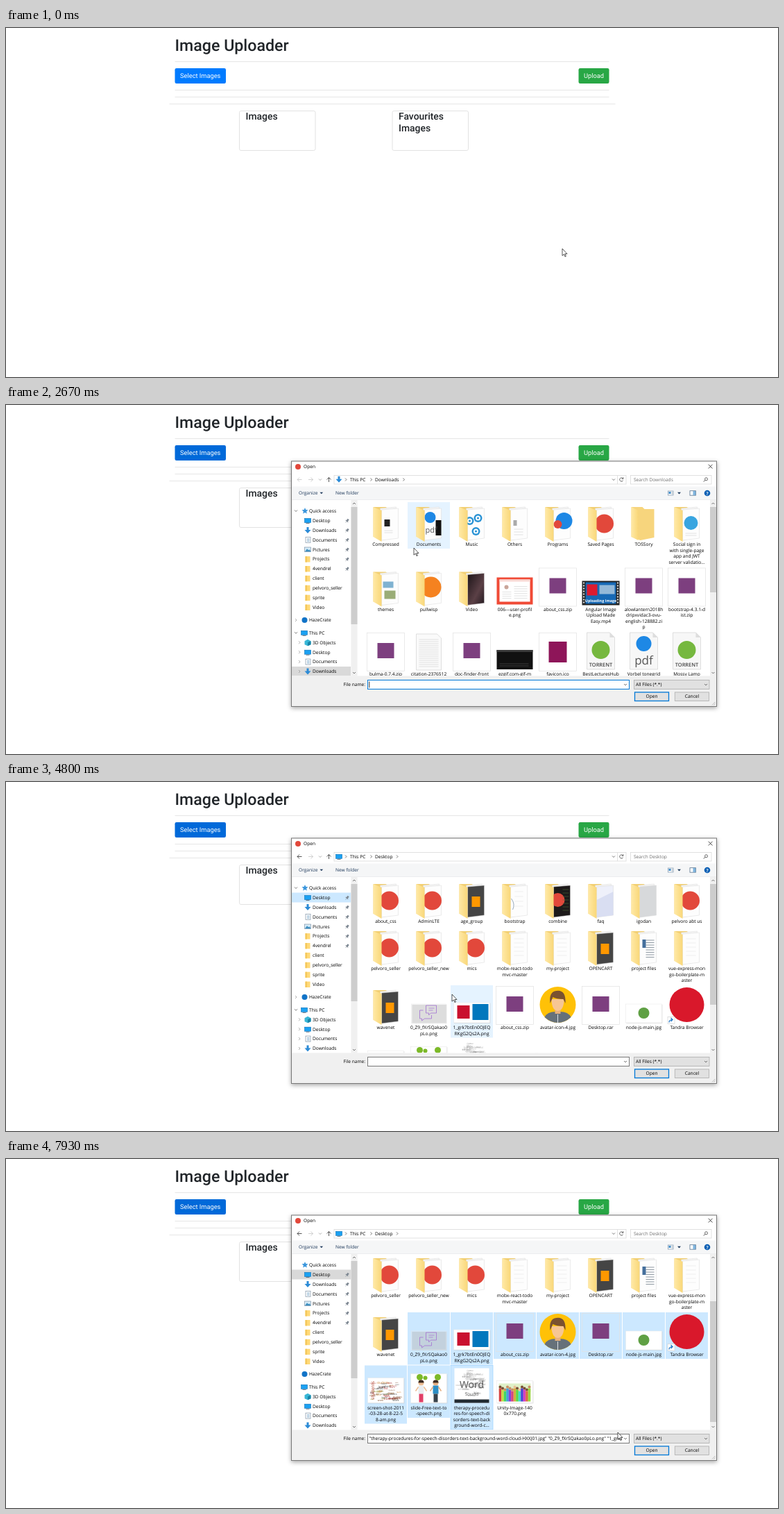
An HTML page for the animation above (8 s loop, 1113 by 503 pixels).

```html
<!DOCTYPE html>
<html lang="en">
<head>
<meta charset="utf-8">
<title>Image Uploader</title>
<style>
html, body { margin: 0; width: 100%; height: 100%; overflow: hidden; background: #fff; }
svg { display: block; width: 100%; height: 100%; }
text { text-rendering: geometricPrecision; }
.page { font-family: Roboto, sans-serif; fill: #212529; }
.head { font-weight: 500; }
.win { font: 6.6px "Open Sans", "Noto Sans", sans-serif; }
.mid { text-anchor: middle; }
</style>
</head>
<body>
<svg id="stage" viewBox="0 0 1113 503"></svg>
<script>
const TICKS = 120, LOOP = 8000;

const rect = (x, y, w, h, fill, more = '') =>
  `<rect x="${x}" y="${y}" width="${w}" height="${h}" fill="${fill}" ${more}/>`;
const box = (x, y, w, h, fill, stroke, more = '') => rect(x, y, w, h, fill, `stroke="${stroke}" ${more}`);
const dot = (x, y, r, fill) => `<circle cx="${x}" cy="${y}" r="${r}" fill="${fill}"/>`;
const shape = (d, fill, more = '') => `<path d="${d}" fill="${fill}" ${more}/>`;
const line = (d, stroke = '#444', w = 0.8, more = '') =>
  `<path d="${d}" fill="none" stroke="${stroke}" stroke-width="${w}" ${more}/>`;
const text = (x, y, s, more = '') => `<text x="${x}" y="${y}" ${more}>${s}</text>`;
const group = (inner, more = '') => `<g ${more}>${inner}</g>`;
const move = (x, y, inner) => group(inner, `transform="translate(${x} ${y})"`);
const right = (x, y, c = '#555') => line(`M${x - 1},${y - 2}l2,2l-2,2`, c);
const down = (x, y, c = '#555') => line(`M${x - 2},${y - 1}l2,2l2,-2`, c);
const up = (x, y, c = '#555') => line(`M${x - 2},${y + 1}l2,-2l2,2`, c);

let seed = 7;
const rnd = () => (seed = seed * 16807 % 2147483647) / 2147483647;
const pick = list => list[Math.floor(rnd() * list.length)];

// --- item icons, drawn around the cell's top centre ---
const RED = '#e2483b', BLUE = '#1e88e5', ORANGE = '#ff9800', GREEN = '#76b83f';
const lines = (x, y, w, n, gap, c = '#cfcfcf') =>
  Array.from({ length: n }, (_, i) => line(`M${x},${y + i * gap}h${w}`, c, 0.6)).join('');

const folder = (inside = '', page = '#fdfdfd') =>
  shape('M-18,7H0l3,2H15V50H-18z', '#f2cf72') +
  shape('M-8,9L15,7V51L-6,55z', '#f4f4f4', 'stroke="#ddd" stroke-width=".5"') +
  shape('M-6,11L18,9V52L-6,55z', page, 'stroke="#d8d8d8" stroke-width=".5"') + inside +
  shape('M-18,7L-6,12V57L-18,50z', 'url(#flap)');
const shut = shape('M-18,7H-2l3,3H15V51L-5,55L-18,50z', '#f7d57d') + shape('M-18,7L-8,12V55L-18,50z', 'url(#flap)');
const papers = folder(lines(-1, 18, 14, 5, 6, '#e4e4e4'));
const browser = folder(dot(5, 31, 13.5, RED));
const code = folder(rect(0, 25, 12, 15, ORANGE), '#454545');
const card = (y, fill = '#fff', x = -26, w = 52) =>
  rect(x + 0.8, y + 0.8, w, 54 - y, '#bbb', 'opacity=".5"') + box(x, y, w, 54 - y, fill, '#e6e6e6', 'stroke-width=".5"');
const frame = inside => box(-27, 1.5, 54, 55, 'none', '#e2e2e2', 'stroke-width=".7"') + inside;
const zip = frame(rect(-12, 16, 24, 22, '#7d3f7f'));
const sheet = inside => shape('M-20,1H13L20,8V54H-20z', '#f7f7f7', 'stroke="#ccc" stroke-width=".6"') +
  shape('M13,1V8H20z', '#ddd') + inside;
const torrent = sheet(dot(0, 26, 13, GREEN) +
  text(0, 50, 'TORRENT', 'class="mid" style="font:600 7.4px Open Sans,sans-serif" fill="#444"'));
const pdf = sheet(dot(0, 17, 11, BLUE) +
  text(0, 47, 'pdf', 'class="mid" style="font:17px Open Sans,sans-serif" fill="#555"'));
const film = rect(-27, 20, 54, 35, '#222') + rect(-22, 22, 44, 31, '#1769b5') + rect(-20, 25, 15, 16, '#dd1b30') +
  rect(-2, 26, 22, 13, '#94b9d8') + text(0, 50, 'Uploading Image', 'class="mid" style="font:700 5.4px Open Sans,sans-serif" fill="#fff"') +
  [-24.5, 24.5].map(x => line(`M${x},22V54`, '#ddd', 2.2, 'stroke-dasharray="2 2"')).join('');
const profile = rect(-26, 15, 52, 39, '#f04a36') + rect(-22, 18, 44, 32, '#fff') + rect(-22, 18, 44, 3, '#f9d8d3') +
  dot(-12, 29, 3, '#c9a59a') + lines(-18, 36, 13, 4, 3) + lines(-1, 28, 19, 6, 3.4);
const recording = rect(-26, 26, 52, 28, '#111') + rect(-26, 26, 52, 3, '#3a3a3a') + lines(-22, 46, 42, 2, 3, '#555');
const chat = card(27, 'none', -25, 50) +
  line('M-4,29h15v11h-8l-3,3v-3h-4zM-8,36h-5v12h3v3l4,-3h10v-5', '#a77bd3', 0.9) + line('M0,33h8m-8,3h6', '#a77bd3');
const avatar = dot(0, 28, 26, '#ffc107') + shape('M-19,46Q-15,37 0,38Q15,37 19,46Q10,54 0,54Q-10,54 -19,46z', '#66717a') +
  rect(-4, 32, 8, 9, '#e8b07a') + shape('M-9,20Q-9,36 0,37Q9,36 9,20z', '#f7c694') +
  shape('M-11,26Q-13,9 -2,8Q12,6 11,26L8,20Q-2,20 -7,17z', '#7a5230') + line('M0,42V54', '#dfe3e6', 1);
const shortcut = dot(0, 28, 25, '#d9182b') + box(-27.5, 45.5, 10, 10, '#fff', '#ccc', 'stroke-width=".6"') +
  line('M-25.5,53.5q0,-4 5,-4m-2.5,-2.5l2.5,2.5l-2.5,2.5', '#1570c4', 1.2);

const WORDS = ['students', 'list', 'read', 'tests', 'class', 'learn', 'school', 'work'];
const words = (n, place, colours) => Array.from({ length: n }, () => {
  const [x, y] = place();
  return text(x.toFixed(1), y.toFixed(1), pick(WORDS),
    `class="mid" style="font-size:${(2 + rnd() * 2.6).toFixed(1)}px" fill="${pick(colours)}"`);
}).join('');
const cloud = card(18) + words(46, () => [rnd() * 40 - 20, 22 + rnd() * 30], ['#a33', '#c87b2a', '#444', '#8a9a32', '#7a4a2a']) +
  text(-17, 36, 'students', 'transform="rotate(-90 -17 36)" class="mid" fill="#b5452e"');
const roundCloud = rect(-25, 4, 50, 50, '#fff') +
  words(48, () => { const a = rnd() * 6.283, r = 19 * Math.sqrt(rnd()); return [r * Math.cos(a) * 0.9, 27 + r * Math.sin(a)]; }, ['#999', '#777', '#bbb']) +
  text(0, 32, 'Word', 'class="mid" style="font-size:14px" fill="#555"') +
  text(0, 43, 'Sound', 'class="mid" fill="#666"') + rect(-25, 49, 50, 5, '#222b33');
const talker = (x, skin, top, legs) => dot(x, 25, 4, skin) + shape(`M${x - 4},25a4,4 0 0 1 8,0z`, '#3a2a22') +
  rect(x - 4, 29, 8, 12, top) + rect(x - 3, 41, 6, 12, legs) + line(`M${x - 4},31l-4,6M${x + 4},31l4,6`, skin, 1.5);
const talkers = card(12) + dot(-13, 17, 4.5, '#7cb928') + dot(-5, 18, 3, '#7cb928') + dot(13, 17, 4.5, '#7cb928') +
  talker(-11, '#edbd94', '#e9edf0', '#e13f66') + talker(10, '#e5ad80', '#2d8ec4', '#38424b');
const crowd = card(22) + rect(-23, 26, 46, 12, '#dff0c8') +
  Array.from({ length: 13 }, (_, i) => {
    const x = -21 + i * 3.5, y = 31 + i % 3 * 2, c = `hsl(${i * 67 % 360} 65% 55%)`;
    return rect(x - 1.8, y + 2, 3.6, 50 - y, c) + dot(x, y, 2, pick(['#c98f65', '#eabf98', '#7a4e35']));
  }).join('');
const tools = card(25) + rect(-21, 29, 18, 19, '#c9102f') + rect(1, 27, 23, 23, '#0277bd');

// --- the two folder listings: label lines split by | ---
const downloads = [
  ['Compressed', folder(rect(-2, 25, 8, 10, '#222') + lines(-2, 41, 12, 2, 3))],
  ['Documents', folder(dot(2, 22, 8, BLUE) + rect(10, 26, 8, 22, '#111') +
    text(-5, 44, 'pdf', 'style="font-size:11px" fill="#555"'))],
  ['Music', folder(['-4 0', '5 15', '8 -4'].map(p => { const [x, y] = p.split(' ').map(Number);
    return dot(x + 1, y + 27, 6, '#2a93d5') + dot(x + 1, y + 27, 3.5, '#fff') + dot(x + 1, y + 27, 1.6, '#2a93d5'); }).join(''))],
  ['Others', folder(rect(-2, 26, 5, 8, '#aaa') + lines(-1, 39, 13, 3, 4))],
  ['Programs', folder(dot(9, 27, 12, BLUE) + dot(0, 32, 6, RED))],
  ['Saved Pages', browser], ['TOSSory', shut],
  ['Social sign in|with single-page|app and JWT|server validatio...', folder(dot(6, 30, 10, '#38a5e0') + lines(-2, 45, 16, 2, 3))],
  ['themes', folder(rect(-4, 21, 15, 9, '#7fb2d1') + rect(-2, 34, 16, 12, '#9aad77'))],
  ['pullwisp', folder(dot(3, 29, 15, '#f58220'))],
  ['Video', folder('', 'url(#dusk)')],
  ['006---user-profil|e.png', profile], ['about_css.zip', zip],
  ['Angular Image|Upload Made|Easy.mp4', film],
  ['alowlantern2018h|dripxvidac3-ovu-|english-128882.zi|p', zip], ['bootstrap-4.3.1-d|ist.zip', zip],
  ['bulma-0.7.4.zip', zip],
  ['citation-2376512', shape('M-18,3H12L18,9V55H-18z', '#fafafa', 'stroke="#ccc" stroke-width=".6"') + lines(-14, 11, 28, 14, 3)],
  ['doc-finder-front', zip], ['ezgif.com-gif-m', recording], ['favicon.ico', frame(rect(-13, 14, 26, 30, '#8e1559'))],
  ['BestLecturesHub', torrent], ['Vorbel tonegrid', pdf], ['Mossy Lamp', torrent]
];
const desktop = [
  ['about_css', browser], ['AdminLTE', browser], ['age_group', code],
  ['bootstrap', folder(lines(0, 18, 12, 4, 7, '#e3e3e3') + line('M-5,28q6,8 2,16', '#9ab', 1))],
  ['combine', folder(dot(0, 30, 10, RED) + lines(7, 15, 9, 7, 5, '#4d6b38'), '#1d1a1a')],
  ['faq', folder(shape('M-6,30L18,18V52L-6,55z', '#d9def2'), '#eef0fa')], ['igodan', folder('', '#d7d9db')], ['pelvoro abt us', browser],
  ['pelvoro_seller', browser], ['pelvoro_seller_new', browser], ['mics', browser],
  ['mobx-react-todo|mvc-master', papers], ['my-project', papers], ['OPENCART', code],
  ['project files', folder(lines(3, 20, 12, 8, 3.5, '#456') + rect(-2, 19, 5, 12, '#456f9c'))],
  ['vue-express-mon|go-boilerplate-m|aster', papers],
  ['wavenet', code], ['0_Z9_fXrSQakao0|pLo.png', chat], ['1_grk7btEn0OJEQ|RKgG2Qs2A.png', tools],
  ['about_css.zip', zip], ['avatar-icon-4.jpg', avatar], ['Desktop.rar', zip],
  ['node-js-main.jpg', card(27) + dot(0, 40, 8, '#5fa044')], ['Tandra Browser', shortcut],
  ['screen-shot-2011|-03-28-at-8-22-5|8-am.png', cloud], ['slide-Free-text-to|-speech.png', talkers],
  ['therapy-procedu|res-for-speech-di|sorders-text-back|ground-word-c...', roundCloud], ['Unity-Image-140|0x770.png', crowd]
];

// Lays items out eight to a row; each row is as tall as its longest label.
function layout(items) {
  let top = 140, tallest = 1;
  return items.map(([label, icon], i) => {
    const rows = label.split('|');
    if (i % 8 === 0 && i) { top += 68 + 8.5 * (tallest - 1); tallest = 1; }
    tallest = Math.max(tallest, rows.length);
    return { x: 547.5 + i % 8 * 62, top, h: 67 + 8.5 * (rows.length - 1), rows, icon };
  });
}
const drawGrid = cells => cells.map(c => move(c.x, c.top,
  rect(-30.5, 0, 61, c.h, 'none', 'class="cell" stroke-width=".7"') + c.icon +
  c.rows.map((s, i) => text(0, 63.2 + i * 8.5, s, 'class="mid"')).join(''))).join('');
const cellsA = layout(downloads), cellsB = layout(desktop);

// --- sidebar ---
const NAV = {
  Desktop: box(-4.5, -3, 9, 6, '#1ba1f2', '#0a6fb5', 'stroke-width=".6"') + rect(-2.5, 3.6, 5, 0.8, '#456'),
  Downloads: shape('M-1.5,-4.5h3v4h3L0,4.5L-4.5,-.5h3z', '#2c8bd6'),
  Documents: box(-3, -4, 7, 8, '#fff', '#7f93a5', 'stroke-width=".7"') + lines(-1, -1.5, 3.5, 3, 1.8, '#4b86b4'),
  Pictures: box(-4.5, -3.2, 9, 6.4, '#d6ecf9', '#7f93a5', 'stroke-width=".7"') + shape('M-4,3l3,-4l2,2l1.5,-1l2,3z', '#3f8fc0'),
  '3D Objects': shape('M0,-4.5L4.5,-2V3L0,5L-4.5,3V-2z', '#37b6d6') + shape('M0,0L4.5,-2V3L0,5z', '#1884a8'),
  folder: rect(-3.5, -4, 7, 8.4, '#ffd978') + rect(-3.5, -4, 2.5, 8.4, '#f4c75c')
};
const pin = y => group(shape('M-.8,-2.8h2.6v3h1v1h-4.6v-1h1z', '#7c8691') + line('M.5,1v2.5', '#7c8691', 0.6),
  `transform="translate(491.5 ${y}) rotate(40)"`);
const navRow = (name, y, x = 442) => move(435, y, NAV[name] || NAV.folder) + text(x, y + 2.3, name);
const quick = ['Desktop', 'Downloads', 'Documents', 'Pictures', 'Projects', '4vendrel', 'client', 'pelvoro_seller', 'sprite', 'Video'];
const pc = ['3D Objects', 'Desktop', 'Documents', 'Downloads'];
const sidebar =
  rect(412, 159.5, 85, 14, 'none', 'id="navTop"') + rect(412, 377, 85, 13.5, '#d9d9d9', 'id="navLow"') +
  shape('M431,148l1.3,3 3.2,.3 -2.4,2.1 .8,3.2 -2.9,-1.7 -2.9,1.7 .8,-3.2 -2.4,-2.1 3.2,-.3z', '#3c97dd') + text(437, 154.8, 'Quick access') +
  quick.map((n, i) => navRow(n, 166.5 + i * 13.9) + (i < 6 ? pin(166.5 + i * 13.9) : '')).join('') +
  dot(430.5, 310, 4, '#1173c7') + text(437, 312.3, 'HazeCrate') +
  move(430, 328.3, NAV.Desktop) + text(437, 330.8, 'This PC') +
  pc.map((n, i) => navRow(n, 342.3 + i * 13.9)).join('') +
  group(down(418, 152.5) + right(418, 310, '#999') + down(418, 328.3) +
    pc.map((n, i) => right(423, 342.3 + i * 13.9, '#999')).join(''), 'id="chevrons"');
const scrollbar = (x, id, h) => rect(x, 136.5, 9, 254, '#f0f0f0') + rect(x, 147, 9, h, '#cdcdcd', `id="${id}"`) +
  up(x + 4.5, 142) + down(x + 4.5, 386);

// --- dialog ---
const windowFrame =
  box(411.5, 81, 613, 353.5, '#fff', '#777', 'style="filter:drop-shadow(0 2px 3px rgba(0,0,0,.35))"') +
  rect(412, 390.5, 612, 43.5, '#f0f0f0') + dot(421, 89, 4, RED) + text(429, 91.4, 'Open') +
  line('M1012.7,85.7l5.8,5.8m0,-5.8l-5.8,5.8', '#222');
const blanks = [[487, 399, 32, 8], [521, 396, 378, 14], [905, 396, 109, 14], [905, 414, 51, 13], [964, 414, 50, 13]]
  .map(b => rect(...b, '#fff')).join('');
const controls =
  text(518, 405, 'File name:', 'text-anchor="end"') +
  box(521.5, 396.5, 377, 13, '#fff', '#7a7a7a', 'id="field"') +
  text(523.5, 405.3, '', 'id="fileName" clip-path="url(#fieldClip)"') + line('M523.8,398.5v9', '#000', 0.8, 'id="caret"') + down(893, 403) +
  box(905.5, 396.5, 108.5, 13, '#e1e1e1', '#adadad', 'stroke-width=".8"') + text(908, 405, 'All Files (*.*)') + down(1009, 403) +
  box(906.5, 414, 49, 12.5, '#e1e1e1', '#0078d7', 'stroke-width="1.3"') + text(931, 422.4, 'Open', 'class="mid"') +
  box(964.3, 414, 49.2, 12.5, '#e1e1e1', '#adadad', 'stroke-width=".8"') + text(989, 422.4, 'Cancel', 'class="mid"') +
  line('M1018,432.5l4.5,-4.5m-2,4.5l2,-2', '#aaa');
const address = (name, end) =>
  move(480, 107.3, NAV[name]) + text(532, 109.8, name) + right(end, 107.5) + text(905, 109.8, 'Search ' + name, 'fill="#6d6d6d"');
const toolbar =
  line('M426.5,107.5h-6.5m3,-3l-3,3l3,3', '#ccc', 0.9, 'id="back"') + line('M436,107.5h6.5m-3,-3l3,3l-3,3', '#ccc', 0.9) +
  down(453, 107.5, '#999') + line('M465.5,111v-6.5m-3,3l3,-3l3,3', '#444', 0.9) +
  box(473, 101.5, 421, 12.5, 'none', '#d9d9d9', 'stroke-width=".8"') + box(900.5, 101.5, 116.5, 12.5, 'none', '#d9d9d9', 'stroke-width=".8"') +
  right(490, 107.5) + text(496, 109.8, 'This PC') + right(526.5, 107.5) + down(876, 107.5) + line('M881.5,102v12', '#d9d9d9') +
  line('M889.5,106a2.6,2.6 0 1 0 .2,2.6m.2,-4.4v2.2h-2.2', '#444') +
  '<circle cx="1009.5" cy="106.8" r="2" fill="none" stroke="#444" stroke-width=".8"/>' + line('M1008,108.3l-2.2,2.2', '#444', 1) +
  group(address('Downloads', 573.5), 'id="pathA"') + group(address('Desktop', 564), 'id="pathB"') +
  rect(412, 117.5, 612, 19, '#f5f6f7') + line('M412,136.5h612', '#e3e5e8', 0.6) +
  text(422, 129.3, 'Organize', 'fill="#1e395b"') + text(475, 129.3, 'New folder', 'fill="#1e395b"') +
  shape('M452.5,125.7h4.6l-2.3,2.6z', '#1e395b') + shape('M968,125.7h5l-2.5,2.8z', '#1e395b') +
  box(954.5, 124, 7.5, 6, '#fff', '#7d95ad', 'stroke-width=".7"') + rect(955.5, 125, 3, 3, '#3d8ac7') + lines(959.5, 126, 2, 2, 2, '#678') +
  box(986, 123.7, 8.5, 6.5, '#fff', '#55708c', 'stroke-width=".8"') + rect(990.5, 124, 3.7, 6, '#7fb4de') +
  dot(1011, 127, 4.3, '#0a5fb4') + text(1011, 129.5, '?', 'class="mid" fill="#fff" font-weight="700"');

// --- page ---
const button = (x, w, fill, label, id) => rect(x, 58, w, 22, fill, `rx="2.3" id="${id}"`) +
  text(x + w / 2, 72.1, label, 'class="mid" style="font-size:9.28px" fill="#fff"');
const title = (x, y, s) => text(x, y, s, 'class="head" style="font-size:13.92px"');
const rule = (x, y, w) => rect(x, y, w, 1, '#e6e6e6');
const cardBox = x => box(x, 119.5, 109.5, 57, '#fff', '#dfdfdf', 'rx="2.3" stroke-width=".9"');
const page = text(243.5, 33.2, 'Image Uploader', 'class="head" style="font-size:23.2px"') +
  [48, 89, 99].map(y => rule(243.5, y, 626)).join('') + rule(235.5, 109, 643) +
  button(243.5, 73.5, '#007bff', 'Select Images', 'select') + button(825.5, 44, '#28a745', 'Upload', 'upload') +
  cardBox(336.5) + cardBox(557) + title(345.5, 132.3, 'Images') + title(566, 132.3, 'Favourites') + title(566, 148.6, 'Images');

const pointer = shape('M0,0V10.2L2.4,8L4,11.6L5.4,11L3.9,7.5H7z', '#fff', 'stroke="#111" stroke-width=".7" id="arrow"') +
  shape('M-.8,0q.9,-1 1.8,0V4.3l4.5,1q1,.4 .8,1.5L5.6,11.5H.6L-3,7q-.2,-1.4 1,-1l1.2,1z', '#fff', 'stroke="#111" stroke-width=".7" id="hand"');

const stage = document.getElementById('stage');
stage.innerHTML = `<defs>
  <linearGradient id="flap"><stop stop-color="#ffe9a6"/><stop offset="1" stop-color="#f9d779"/></linearGradient>
  <linearGradient id="dusk" x2="1" y2="1"><stop stop-color="#1c1418"/><stop offset=".6" stop-color="#5b4046"/><stop offset="1" stop-color="#241a20"/></linearGradient>
  <clipPath id="listClip">${rect(507, 136.8, 508, 253.4, '#000')}</clipPath>
  <clipPath id="sideClip">${rect(412, 136.8, 85, 253.7, '#000')}</clipPath>
  <clipPath id="fieldClip">${rect(522, 397, 366, 12, '#000')}</clipPath></defs>` +
  rect(0, 0, 1113, 503, '#fff') + group(page, 'class="page"') +
  group(windowFrame + group(blanks, 'id="blanks"') + group(controls, 'id="controls"') +
    group(toolbar + group(sidebar, 'clip-path="url(#sideClip)"') + scrollbar(497.5, 'sideThumb', 169) + scrollbar(1015, 'thumb', 123), 'id="panes"') +
    group(group(drawGrid(cellsA), 'id="gridA"') + group(drawGrid(cellsB), 'id="gridB"'), 'clip-path="url(#listClip)"'),
    'id="dialog" class="win"') +
  group(pointer, 'id="pointer"');

const el = {};
stage.querySelectorAll('[id]').forEach(e => el[e.id] = e);
cellsA.forEach((c, i) => c.el = el.gridA.querySelectorAll('.cell')[i]);
cellsB.forEach((c, i) => c.el = el.gridB.querySelectorAll('.cell')[i]);
const show = (e, on) => e.setAttribute('display', on ? 'inline' : 'none');
const set = (e, attrs) => { for (const a in attrs) e.setAttribute(a, attrs[a]); };
const clamp = v => Math.min(1, Math.max(0, v));

// Pointer moves: start tick, end tick, x, y.
const moves = [
  [3, 6, 513, 164], [8, 12, 271, 83], [14, 17, 271, 81], [18, 19, 271, 78], [19, 26, 274, 79], [27, 28, 274, 85],
  [29, 30, 345, 118], [31, 32, 500, 180], [33, 38, 584, 200], [38, 40, 588, 206], [40, 44, 575, 200], [45, 50, 447, 167],
  [53, 58, 668, 246], [58, 59, 690, 248], [59, 60, 725, 246], [60, 61, 866, 279], [61, 62, 812, 280], [68, 72, 643, 306],
  [74, 76, 651, 322], [83, 89, 642, 346], [89, 92, 618, 340], [93, 98, 612, 344], [100, 106, 667, 376], [111, 119, 882, 394]
];
function pointerAt(k) {
  let x = 802, y = 318;
  for (const [a, b, tx, ty] of moves) {
    const p = clamp((k - a) / (b - a));
    x += (tx - x) * p;
    y += (ty - y) * p;
  }
  return [x, y];
}

const NAMES = ['', '1_grk7btEn0OJEQRKgG2Qs2A.png', '0_Z9_fXrSQakao0pLo.png',
  '"therapy-procedures-for-speech-disorders-text-background-word-cloud-HXXJ01.jpg" "0_Z9_fXrSQakao0pLo.png" "1_grk7btEn0OJEQRKgG2Qs2A.png"'];
const RANGES = [[-1, -1, -1], [18, 18, 18], [17, 17, 17], [17, 26, 26]];

function draw(k) {
  const [x, y] = pointerAt(k), hand = k >= 19 && k < 28;
  set(el.pointer, { transform: `translate(${x} ${y})` });
  show(el.hand, hand);
  show(el.arrow, !hand);
  const m = clamp((k - 18) / 3);
  set(el.select, { fill: `rgb(0 ${123 - 18 * m} ${255 - 38 * m})` });

  const open = k < 30 ? 0 : k < 32 ? 1 : 2, size = [0.967, 0.99, 1][open];
  show(el.dialog, k >= 28);
  set(el.dialog, { opacity: [0.37, 0.8, 1][open], transform: `translate(717.7 257.5) scale(${size}) translate(-717.7 -257.5)` });
  show(el.blanks, k < 32);
  show(el.controls, k >= 32);
  show(el.panes, k >= 34);

  const there = k >= 52, onB = k >= 53;
  show(el.pathA, !there);
  show(el.pathB, there);
  set(el.back, { stroke: there ? '#444' : '#ccc' });
  show(el.gridA, k >= 36 && !onB);
  show(el.gridB, onB);
  show(el.navLow, !there);
  set(el.navTop, { fill: k < 49 ? 'none' : k < 52 ? '#e5f3ff' : k < 85 ? '#cce8ff' : '#d9d9d9' });
  set(el.chevrons, { opacity: 1 - clamp((k - 94) / 6) });
  set(el.field, { stroke: there ? '#7a7a7a' : '#0078d7' });
  show(el.caret, !there);

  const scroll = k < 108 ? 0 : k < 110 ? 40 : 72;
  set(el.gridB, { transform: `translate(0 ${-scroll})` });
  set(el.thumb, { y: 147 + scroll * 58 / 72, height: onB ? 174 : 123 });

  const pick = k < 85 ? 0 : k < 98 ? 1 : k < 107 ? 2 : 3, [from, to, focus] = RANGES[pick];
  el.fileName.textContent = NAMES[pick];
  const [hx, hy] = pointerAt(k - 1);
  (onB ? cellsB : cellsA).forEach((c, i) => {
    const top = c.top - scroll, chosen = i >= from && i <= to;
    const hover = Math.abs(hx - c.x) < 30.5 && hy >= top && hy < top + c.h && hy < 390;
    set(c.el, { fill: chosen ? '#cce8ff' : hover ? '#e5f3ff' : 'none', stroke: chosen && i === focus ? '#99d1ff' : 'none' });
  });
}

const start = performance.now();
function tick() {
  const t = (performance.now() - start) % LOOP;
  draw(Math.floor((t + 3.5) * TICKS / LOOP) % TICKS);
  requestAnimationFrame(tick);
}
tick();
</script>
</body>
</html>
```
